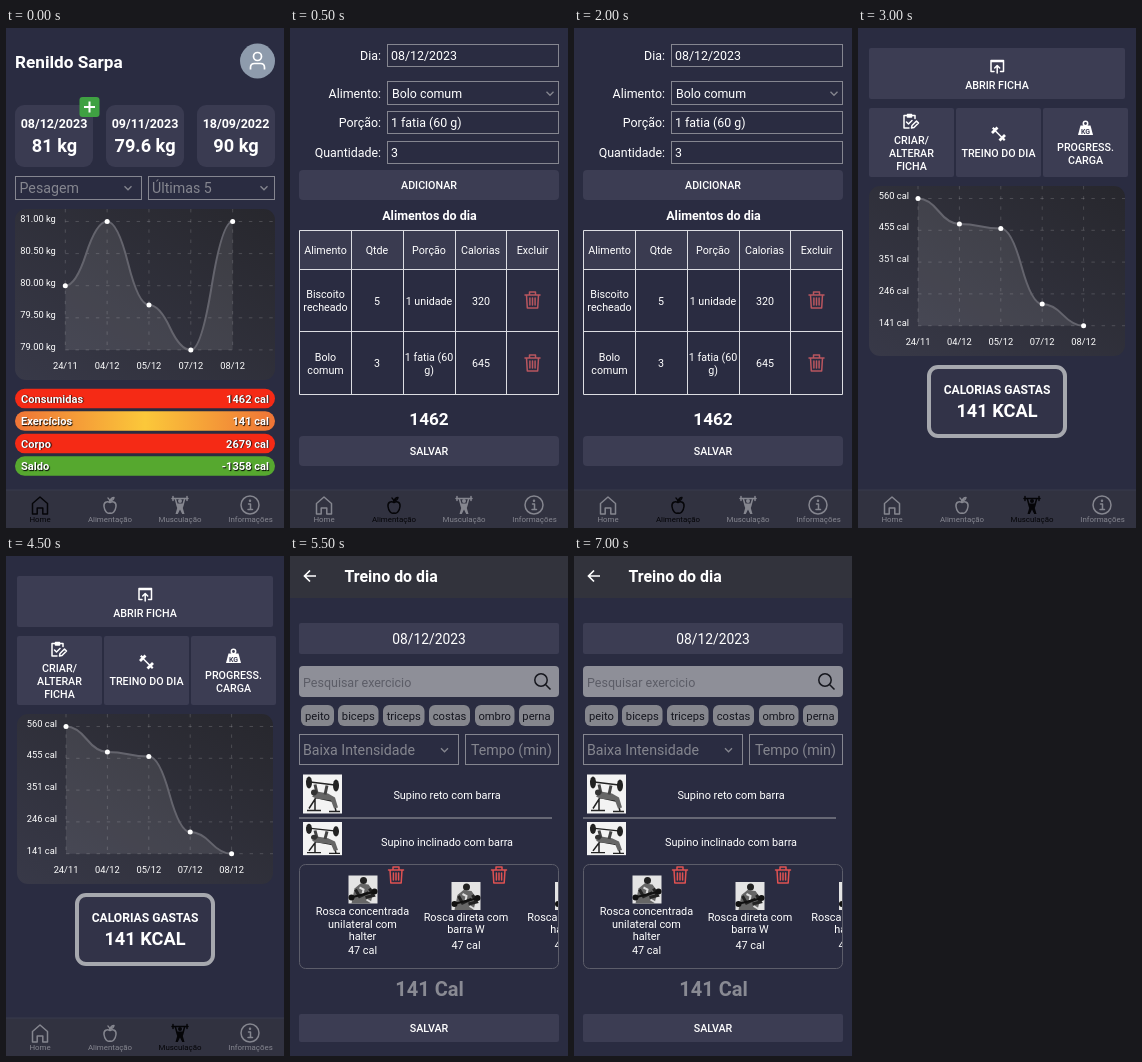
Animation of 278x500 px, one loop 8000 ms. Source, as an HTML page:

```html
<!DOCTYPE html>
<html lang="pt-BR">
<head>
<meta charset="utf-8">
<title>Treino e dieta</title>
<style>
  html, body { margin: 0; width: 100%; height: 100%; overflow: hidden; background: #2a2c41; }
  svg.stage { display: block; width: 100vw; height: 100vh; font-family: Roboto, sans-serif; }
  text { fill: #fff; }
  .m { text-anchor: middle; }
  .e { text-anchor: end; }
  .b { font-weight: 700; }
  .btn { fill: #3c3d53; }
  .box { fill: none; stroke: #858690; }
  .dim { fill: #85868f; font-size: 14.2px; }
  .chev { fill: none; stroke: #85868f; stroke-width: 1.3; }
  .cap { font-size: 10.7px; font-weight: 500; text-anchor: middle; }
  .form { font-size: 12.4px; }
  .cell { font-size: 10.7px; text-anchor: middle; }
  .day .cell { font-size: 10.9px; }
  .bars { font-size: 11.1px; font-weight: 700; }
  .bars text { text-shadow: .8px .8px 1px #000; }
  .axis { font-size: 9.3px; }
  .grid { stroke: #fff; stroke-opacity: .2; stroke-width: .8; stroke-dasharray: 3.4 6.8; }
  .curve { fill: none; stroke: #64646d; stroke-width: 2; }
  .tag { fill: #85868d; }
  .chips text { fill: #15161f; font-size: 11.2px; text-anchor: middle; }
  .line { fill: none; stroke: currentColor; stroke-width: 1.5; stroke-linecap: round; stroke-linejoin: round; }
  .solid { fill: currentColor; }
  .tab { color: #85868f; }
  .tab text { fill: currentColor; font-size: 7.9px; text-anchor: middle; }

  .scene, .tabs, .tab { animation: 8s step-end infinite; }
  .home { animation-name: home; }
  .food { animation-name: food; }
  .gym { animation-name: gym; }
  .day { animation-name: day; }
  .tabs { animation-name: tabs; }
  .t-home { animation-name: t-home; }
  .t-food { animation-name: t-food; }
  .t-gym { animation-name: t-gym; }
  @keyframes home { 0% { opacity: 1 } 6.25%, 100% { opacity: 0 } }
  @keyframes food { 0% { opacity: 0 } 6.25% { opacity: 1 } 37.5%, 100% { opacity: 0 } }
  @keyframes gym { 0% { opacity: 0 } 37.5% { opacity: 1 } 68.75%, 100% { opacity: 0 } }
  @keyframes day { 0% { opacity: 0 } 68.75%, 100% { opacity: 1 } }
  @keyframes tabs { 0% { opacity: 1 } 68.75%, 100% { opacity: 0 } }
  @keyframes t-home { 0% { color: #050508 } 6.25%, 100% { color: #85868f } }
  @keyframes t-food { 0% { color: #85868f } 6.25% { color: #050508 } 37.5%, 100% { color: #85868f } }
  @keyframes t-gym { 0% { color: #85868f } 37.5% { color: #050508 } 68.75%, 100% { color: #85868f } }
</style>
</head>
<body>
<svg class="stage" viewBox="0 0 278 500" preserveAspectRatio="none">
  <defs>
    <linearGradient id="panel" x1="0" y1="1" x2="1" y2="0">
      <stop stop-color="#383948"/><stop offset="1" stop-color="#27272d"/>
    </linearGradient>
    <linearGradient id="warm">
      <stop stop-color="#ef7436"/><stop offset=".5" stop-color="#fbc83a"/><stop offset="1" stop-color="#ef7436"/>
    </linearGradient>
    <clipPath id="list"><rect x="10" y="309" width="258" height="103" rx="6"/></clipPath>

    <path id="chev" class="chev" d="M-3.5-1.8 0 1.8 3.5-1.8"/>
    <g id="trash" class="line">
      <path d="M-7.5-5H7.5M-6-5-5.2 8H5.2L6-5M-3-5V-8H3V-5M-2.6-2V5M0-2V5M2.6-2V5"/>
    </g>
    <path id="i-home" class="line" d="M-7.500 8.500V-2L0-8.500 7.500-2V8.500H2.800V2.500H-2.800V8.500Z"/>
    <path id="i-food" class="line" d="M0-3C-3-4.500-6.500-3.500-6 1-5.500 5-3 9 0 7.500 3 9 5.500 5 6 1 6.500-3.500 3-4.500 0-3Q0-6-2-7.500M.5-5Q1-8 4-8 3.500-5 .5-5"/>
    <g id="i-gym">
      <circle class="solid" cy="-4" r="2"/>
      <path class="line" d="M-8-6.500H8M-7-8.500V-4.500M7-8.500V-4.500"/>
      <path class="solid" d="M-5.500-6.500H-4L-2.500-1.500H2.500L4-6.500H5.500L3.500 1 2.800 3 4.500 9H2.200L0 4.500-2.200 9H-4.500L-2.800 3-3.500 1Z"/>
    </g>
    <g id="i-info" class="line">
      <circle r="9"/><path d="M-1.500-1H.5V4.500M-2 4.500H2.500"/><circle class="solid" cy="-4.200" r=".5"/>
    </g>
    <g id="bench">
      <rect width="39" height="39" fill="#f3f3f3"/>
      <path d="M3 7 36 11M6 34 13 23 31 27 33 37M12 36V24M4 36H18M26 37H37" fill="none" stroke="#222" stroke-width="1.500"/>
      <path d="M9 22 14 17 25 19 32 23 35 33 31 34 28 26 13 24Z" fill="#666"/>
      <path d="M14 19 12 10M22 20 24 11" stroke="#444" stroke-width="3"/>
      <circle cx="11" cy="18" r="3" fill="#333"/>
      <ellipse cx="6" cy="8" rx="3" ry="6" fill="#222"/><ellipse cx="33" cy="11" rx="3" ry="6" fill="#222"/>
    </g>
    <g id="curl">
      <rect width="29" height="28" fill="#e4e4e4"/>
      <path d="M3 28 6 13 12 8 20 9 25 16 22 28Z" fill="#666"/>
      <path d="M11 12 15 14 14 19M18 24 23 27" fill="none" stroke="#ddd" stroke-width="2"/>
      <path d="M7 14 11 21 20 17M21 13 25 20 17 22" fill="none" stroke="#222" stroke-width="3"/>
      <circle cx="15" cy="5" r="3.500" fill="#222"/>
      <path d="M2 22 27 16" stroke="#111" stroke-width="2"/>
      <circle cx="3" cy="22" r="3" fill="#111"/><circle cx="26" cy="16" r="3" fill="#111"/>
    </g>
  </defs>

  <rect width="278" height="500" fill="#2a2c41"/>

  <g class="scene home">
    <text class="b" x="9" y="40" font-size="17.2">Renildo Sarpa</text>
    <circle cx="251.500" cy="33" r="17.500" fill="#8e9bac"/>
    <g fill="none" stroke="#fff" stroke-width="1.700">
      <circle cx="251.500" cy="28.500" r="4"/>
      <path d="M244.500 41.500V39.500Q244.500 35.500 248.500 35.500H254.500Q258.500 35.500 258.500 39.500V41.500"/>
    </g>
    <g fill="#3a3b51">
      <rect x="9" y="77" width="78" height="62" rx="9"/>
      <rect x="100" y="77" width="78" height="62" rx="9"/>
      <rect x="191" y="77" width="78" height="62" rx="9"/>
    </g>
    <g class="b m" font-size="12.500">
      <text x="48" y="100">08/12/2023</text><text x="139" y="100">09/11/2023</text><text x="230" y="100">18/09/2022</text>
    </g>
    <g class="b m" font-size="18.200">
      <text x="48.500" y="124">81 kg</text><text x="139" y="124">79.6 kg</text><text x="230" y="124">90 kg</text>
    </g>
    <rect x="73.500" y="69" width="20" height="20" rx="3" fill="#3fa142"/>
    <path d="M83.500 73.500V84.500M78 79H89" stroke="#fff" stroke-width="2"/>
    <rect class="box" x="9.500" y="148.500" width="126" height="23"/>
    <rect class="box" x="142.500" y="148.500" width="126" height="23"/>
    <text class="dim" x="13.500" y="165">Pesagem</text><text class="dim" x="146" y="165">Últimas 5</text>
    <use href="#chev" x="122" y="160"/><use href="#chev" x="258" y="160"/>
    <rect x="9" y="181" width="260" height="171" rx="11" fill="url(#panel)"/>
    <g id="weight"></g>
    <g class="bars">
      <rect x="9" y="360.800" width="260" height="19.500" rx="9.700" fill="#f52a15"/>
      <rect x="9" y="383.300" width="260" height="19.500" rx="9.700" fill="url(#warm)"/>
      <rect x="9" y="405.800" width="260" height="19.500" rx="9.700" fill="#f52a15"/>
      <rect x="9" y="428.300" width="260" height="19.500" rx="9.700" fill="#56a82f"/>
      <text x="15" y="374.500">Consumidas</text><text class="e" x="263" y="374.500">1462 cal</text>
      <text x="15" y="397">Exercícios</text><text class="e" x="263" y="397">141 cal</text>
      <text x="15" y="419.500">Corpo</text><text class="e" x="263" y="419.500">2679 cal</text>
      <text x="15" y="442">Saldo</text><text class="e" x="263" y="442">-1358 cal</text>
    </g>
  </g>

  <g class="scene food">
    <g class="form e">
      <text x="91" y="32">Dia:</text><text x="91" y="70">Alimento:</text>
      <text x="91" y="99">Porção:</text><text x="91" y="129">Quantidade:</text>
    </g>
    <g class="box">
      <rect x="97.500" y="16.500" width="171" height="22"/><rect x="97.500" y="53.500" width="171" height="23"/>
      <rect x="97.500" y="83.500" width="171" height="22"/><rect x="97.500" y="113.500" width="171" height="22"/>
    </g>
    <g class="form">
      <text x="101" y="32">08/12/2023</text><text x="102" y="70">Bolo comum</text>
      <text x="101" y="99">1 fatia (60 g)</text><text x="101" y="129">3</text>
    </g>
    <use href="#chev" x="260" y="65.500"/>
    <rect class="btn" x="9" y="142" width="260" height="30" rx="4"/>
    <text class="cap" x="139" y="161">ADICIONAR</text>
    <text class="b m" x="139.500" y="192" font-size="12.500">Alimentos do dia</text>
    <rect x="9" y="202" width="260" height="39" fill="#3a3b50"/>
    <path d="M9.500 202.500H268.500V366.500H9.500ZM9.500 241.500H268.500M9.500 303.500H268.500M61.500 202.500V366.500M113.500 202.500V366.500M165.500 202.500V366.500M216.500 202.500V366.500" fill="none" stroke="#dcdde2"/>
    <g class="cell">
      <text x="35.500" y="226">Alimento</text><text x="87" y="226">Qtde</text><text x="139" y="226">Porção</text>
      <text x="190.500" y="226">Calorias</text><text x="242.500" y="226">Excluir</text>
      <text x="35.500" y="270">Biscoito</text><text x="35.500" y="283">recheado</text><text x="87" y="276.500">5</text>
      <text x="139" y="276.500">1 unidade</text><text x="191" y="276.500">320</text>
      <text x="35.500" y="332.500">Bolo</text><text x="35.500" y="345.500">comum</text><text x="87" y="339">3</text>
      <text x="139" y="332.500">1 fatia (60</text><text x="139" y="345.500">g)</text><text x="191" y="339">645</text>
    </g>
    <g color="#b9565f"><use href="#trash" x="242.500" y="272"/><use href="#trash" x="242.500" y="335"/></g>
    <text class="b m" x="139" y="397" font-size="17.200">1462</text>
    <rect class="btn" x="9" y="408" width="260" height="30" rx="4"/>
    <text class="cap" x="139" y="427">SALVAR</text>
  </g>

  <g class="scene gym">
    <rect class="btn" x="11" y="20" width="256" height="51" rx="2"/>
    <rect class="btn" x="11" y="80" width="85" height="69" rx="2"/>
    <rect class="btn" x="98" y="80" width="85" height="69" rx="2"/>
    <rect class="btn" x="185" y="80" width="85" height="69" rx="2"/>
    <g color="#fff">
      <path class="line" d="M136 43.500H133V32.500H145.500V43.500H142.500M133 33.500H145.500M139.200 45V38M136.700 40 139.200 37.500 141.700 40"/>
      <path class="line" d="M51 100H46V87.500H57V90.500M49.500 86.500H53.500V89H49.500ZM48.500 94 50.500 96 54 92.500M53.500 100 54 97.500 58.500 93 60.500 95 56 99.500Z"/>
      <path class="line" d="M136.500 102 144.500 110" stroke-width="2.200"/>
      <path d="M134 105 139.500 99.500M135 101.500 136.500 100M141.500 112.500 147 107M145 112 146.500 110.500" stroke="#fff" stroke-width="2.800"/>
      <circle class="line" cx="227.500" cy="95.500" r="2.200"/>
      <path class="solid" d="M222.500 97.500H232.500L235 107H220Z"/>
    </g>
    <text class="b m" x="227.500" y="105.500" font-size="7" style="fill:#3c3d53">KG</text>
    <g class="cap">
      <text x="139" y="61">ABRIR FICHA</text>
      <text x="53.500" y="115.500">CRIAR/</text><text x="53.500" y="128.500">ALTERAR</text><text x="53.500" y="141.500">FICHA</text>
      <text x="140.500" y="129">TREINO DO DIA</text>
      <text x="227.500" y="123">PROGRESS.</text><text x="227.500" y="136">CARGA</text>
    </g>
    <rect x="11" y="158" width="256" height="170" rx="11" fill="url(#panel)"/>
    <g id="burn"></g>
    <rect x="71" y="339" width="136" height="69" rx="9" fill="#323348" stroke="#a6a8ae" stroke-width="4"/>
    <text class="b m" x="139" y="366" font-size="12.100">CALORIAS GASTAS</text>
    <text class="b m" x="139" y="389" font-size="18.200">141 KCAL</text>
  </g>

  <g class="tabs">
    <rect y="462" width="278" height="38" fill="#313240"/>
    <path d="M0 462H278" stroke="#383a4c"/>
    <g class="tab t-home"><use href="#i-home" x="34" y="477.500"/><text x="34" y="493.500">Home</text></g>
    <g class="tab t-food"><use href="#i-food" x="104" y="477.500"/><text x="104" y="493.500">Alimentação</text></g>
    <g class="tab t-gym"><use href="#i-gym" x="174" y="477"/><text x="174" y="493.500">Musculação</text></g>
    <g class="tab"><use href="#i-info" x="244" y="477"/><text x="244.500" y="493.500">Informações</text></g>
  </g>

  <g class="scene day">
    <rect width="278" height="42" fill="#32333c"/>
    <path d="M26 20H15M20 14.500 14.500 20 20 25.500" fill="none" stroke="#fff" stroke-width="1.700"/>
    <text class="b" x="54.500" y="26" font-size="15.900">Treino do dia</text>
    <rect class="btn" x="9" y="67" width="260" height="31" rx="2"/>
    <text class="m" x="139" y="88" font-size="13.800">08/12/2023</text>
    <rect x="9" y="110" width="260" height="31" rx="4" fill="#8e8f98"/>
    <text x="13" y="131" font-size="12.500" style="fill:#5c5d67">Pesquisar exercicio</text>
    <path d="M255.500 128.500 260.500 133.500M257.200 124A6.200 6.200 0 1 1 244.800 124A6.200 6.200 0 1 1 257.200 124" fill="none" stroke="#16171e" stroke-width="1.500"/>
    <g class="tag">
      <rect x="11" y="149" width="33" height="21" rx="6"/><rect x="48" y="149" width="40.500" height="21" rx="6"/>
      <rect x="93" y="149" width="41.500" height="21" rx="6"/><rect x="139" y="149" width="41" height="21" rx="6"/>
      <rect x="185" y="149" width="39.500" height="21" rx="6"/><rect x="229" y="149" width="35" height="21" rx="6"/>
    </g>
    <g class="chips">
      <text x="27.500" y="163.500">peito</text><text x="68.300" y="163.500">biceps</text><text x="113.700" y="163.500">triceps</text>
      <text x="159.500" y="163.500">costas</text><text x="204.700" y="163.500">ombro</text><text x="246.500" y="163.500">perna</text>
    </g>
    <rect class="box" x="9.500" y="178.500" width="159" height="30"/>
    <rect class="box" x="175.500" y="178.500" width="93" height="30"/>
    <text class="dim" x="13" y="199">Baixa Intensidade</text><text class="dim" x="181" y="199">Tempo (min)</text>
    <use href="#chev" x="154.500" y="194"/>
    <use href="#bench" x="13" y="218.500"/>
    <use href="#bench" transform="translate(13 266) scale(1 .85)"/>
    <path d="M9 262H262" stroke="#a2a3a9"/>
    <g class="cell">
      <text x="157" y="243">Supino reto com barra</text><text x="157" y="290">Supino inclinado com barra</text>
    </g>
    <rect x="9.500" y="308.500" width="259" height="104" rx="6" fill="none" stroke="#5c5d6a"/>
    <g clip-path="url(#list)">
      <use href="#curl" x="58.500" y="319.500"/><use href="#curl" x="161.500" y="326"/><use href="#curl" x="265" y="326"/>
      <g color="#e05252"><use href="#trash" x="106" y="319"/><use href="#trash" x="209" y="319"/></g>
      <g class="cell">
        <text x="72.500" y="358.500">Rosca concentrada</text><text x="72.500" y="371.500">unilateral com</text>
        <text x="72.500" y="384">halter</text><text x="72.500" y="398">47 cal</text>
        <text x="176" y="365">Rosca direta com</text><text x="176" y="377">barra W</text><text x="176" y="393">47 cal</text>
        <text x="279" y="365">Rosca martelo c/</text><text x="274" y="377">halter</text><text x="279" y="393">47 cal</text>
      </g>
    </g>
    <text class="b m" x="139.500" y="439.500" font-size="20" style="fill:#898a93">141 Cal</text>
    <rect class="btn" x="9" y="458" width="260" height="28" rx="2"/>
    <text class="cap" x="139" y="475.500">SALVAR</text>
  </g>
</svg>
<script>
  const DAYS = ['24/11', '04/12', '05/12', '07/12', '08/12'];

  // Line chart: each span is two quadratic arcs meeting at its midpoint.
  function chart(id, { x0, top, step, card, right, labels, labelX, ys }) {
    const dx = (right - x0) / DAYS.length, base = top + 4 * step, x = i => x0 + i * dx;
    let grid = '', text = '', dots = '', d = `M${x0} ${ys[0]}`;
    DAYS.forEach((day, i) => {
      const y = top + i * step;
      grid += `M${x0} ${y}H${right}M${x(i)} ${card}V${base}`;
      text += `<text class="e" x="${labelX}" y="${y}">${labels[i]}</text>
        <text class="m" x="${x(i)}" y="${base + 19}">${day}</text>`;
      dots += `<circle cx="${x(i)}" cy="${ys[i]}" r="2.5" fill="#fff"/>`;
      if (i) d += `Q${x(i - .75)} ${ys[i - 1]} ${x(i - .5)} ${(ys[i - 1] + ys[i]) / 2}Q${x(i - .25)} ${ys[i]} ${x(i)} ${ys[i]}`;
    });
    document.getElementById(id).innerHTML = `
      <path class="grid" d="${grid}"/>
      <path d="${d}V${base}H${x0}Z" fill="#fff" fill-opacity=".09"/>
      <path class="curve" d="${d}"/>${dots}<g class="axis">${text}</g>`;
  }

  chart('weight', {
    x0: 59.3, top: 193.5, step: 32.1, card: 181, right: 268.5, labelX: 49.8,
    labels: ['81.00 kg', '80.50 kg', '80.00 kg', '79.50 kg', '79.00 kg'],
    ys: [257.7, 193.5, 277, 322, 193.5]
  });
  chart('burn', {
    x0: 60, top: 170.5, step: 31.8, card: 158, right: 267, labelX: 51,
    labels: ['560 cal', '455 cal', '351 cal', '246 cal', '141 cal'],
    ys: [170.5, 196, 200.5, 276, 297.7]
  });
</script>
</body>
</html>
```
